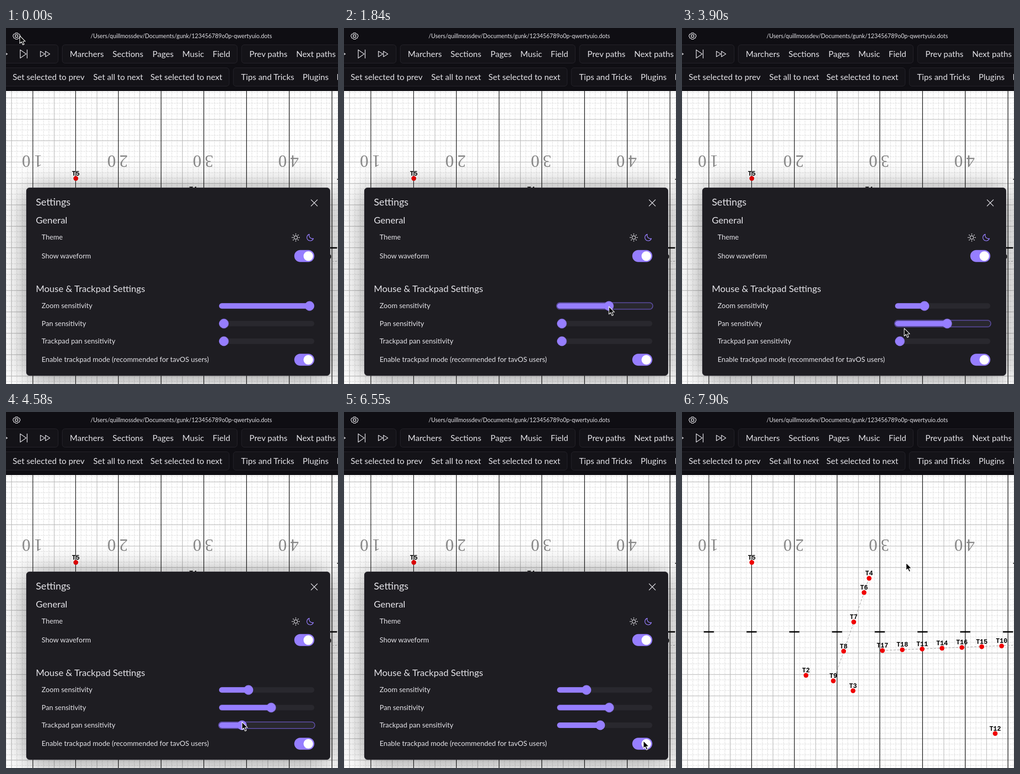
Write an HTML page that moves like this. It is 723 by 774 pixels and loops after 8000 ms.

```html
<!DOCTYPE html>
<html lang="en">
<head>
<meta charset="utf-8">
<title>Drill editor settings</title>
<style>
  html, body { margin: 0; width: 100%; height: 100%; overflow: hidden; background: #fff; }
  #stage { position: relative; width: 723px; height: 774px; overflow: hidden; }
  svg, #modal { position: absolute; left: 0; top: 0; width: 723px; height: 774px; }
  text { font-family: Lato, "Open Sans", sans-serif; fill: #e4e3e8; white-space: pre; }
  .menu { font-size: 18px; }
  .path { font-size: 12.6px; }
  .title { font-size: 21.5px; }
  .head { font-size: 20px; }
  .item { font-size: 15.3px; }
  .yard { font: 37px "Liberation Serif", "Times New Roman", serif; fill: #888; text-anchor: middle; }
  .tag { font: bold 14px "Liberation Mono", "Courier New", monospace; fill: #000; text-anchor: middle; }
  .icon { fill: none; stroke: #e4e3e8; stroke-width: 1.4; stroke-linejoin: round; stroke-linecap: round; }
  .group { fill: #141318; stroke: #27252c; }
  .panel {
    position: absolute; left: 43.5px; top: 346.5px; width: 660px; height: 407px;
    background: #1e1d22; border: 1px solid #2f2d35; border-radius: 7px;
    box-shadow: 0 4px 60px rgba(0, 0, 0, .45);
  }
  .track { fill: #29282e; }
  .accent { fill: #967eff; }
  .ring { fill: none; stroke: #5f4fa6; stroke-width: 1.8; opacity: 0; }

  /* every animation shares one 8 s clock */
  #modal, #cursor, #close, .zoom *, .pan *, .trackpad *, .flip * {
    animation: 8s linear infinite;
  }
  #modal { animation-name: dismiss; }
  #cursor { animation-name: pointer; }
  #close { animation-name: hover; }
  .zoom .fill { animation-name: zoomFill; }
  .zoom .thumb { animation-name: zoomThumb; }
  .zoom .ring { animation-name: zoomRing; }
  .pan .fill { animation-name: panFill; }
  .pan .thumb { animation-name: panThumb; }
  .pan .ring { animation-name: panRing; }
  .trackpad .fill { animation-name: trackFill; }
  .trackpad .thumb { animation-name: trackThumb; }
  .trackpad .ring { animation-name: trackRing; }
  .flip .pill { animation-name: flipPill; }
  .flip .knob { animation-name: flipKnob; }

  @keyframes zoomFill {
    0%, 18.1% { width: 197px; animation-timing-function: ease-in-out; }
    26.6%, 100% { width: 64px; }
  }
  @keyframes zoomThumb {
    0%, 18.1% { transform: translateX(197px); animation-timing-function: ease-in-out; }
    26.6%, 100% { transform: translateX(64px); }
  }
  @keyframes zoomRing { 0%, 18% { opacity: 0; } 18.01%, 36.8% { opacity: 1; } 36.81%, 100% { opacity: 0; } }
  @keyframes panFill {
    0%, 36.9% { width: 10.5px; }
    39.1% { width: 33px; animation-timing-function: ease-out; }
    42.75%, 100% { width: 113.5px; }
  }
  @keyframes panThumb {
    0%, 36.9% { transform: translateX(10.5px); }
    39.1% { transform: translateX(33px); animation-timing-function: ease-out; }
    42.75%, 100% { transform: translateX(113.5px); }
  }
  @keyframes panRing { 0%, 36.8% { opacity: 0; } 36.81%, 53.5% { opacity: 1; } 53.51%, 100% { opacity: 0; } }
  @keyframes trackFill {
    0%, 55% { width: 10.5px; }
    56% { width: 13px; animation-timing-function: ease-out; }
    60.1%, 100% { width: 94px; }
  }
  @keyframes trackThumb {
    0%, 55% { transform: translateX(10.5px); }
    56% { transform: translateX(13px); animation-timing-function: ease-out; }
    60.1%, 100% { transform: translateX(94px); }
  }
  @keyframes trackRing { 0%, 53.5% { opacity: 0; } 53.51%, 73.8% { opacity: 1; } 73.81%, 100% { opacity: 0; } }
  @keyframes flipPill { 0%, 73.8% { fill: #967eff; } 75.6%, 77.5% { fill: #35333b; } 79.3%, 100% { fill: #967eff; } }
  @keyframes flipKnob {
    0%, 73.8% { transform: none; }
    75.6%, 77.5% { transform: translateX(-17px); }
    79.3%, 100% { transform: none; }
  }
  @keyframes hover { 0%, 92.3% { stroke: #e4e3e8; } 93.5%, 100% { stroke: #dd3a47; } }
  @keyframes dismiss { 0%, 95.7% { opacity: 1; } 97.2%, 99.99% { opacity: 0; } 100% { opacity: 1; } }
  @keyframes pointer {
    0%, .375% { transform: translate(30px, 17px); animation-timing-function: ease-in; }
    4% { transform: translate(235px, 165px); }
    7% { transform: translate(540px, 385px); }
    10.2% { transform: translate(657px, 484px); animation-timing-function: ease-out; }
    13% { transform: translate(650px, 624px); }
    14.5% { transform: translate(651px, 617px); animation-timing-function: ease-in-out; }
    16.8%, 18.1% { transform: translate(661px, 605px); animation-timing-function: ease-in-out; }
    26.6%, 29.3% { transform: translate(528px, 606px); }
    31.875% { transform: translate(494px, 628px); animation-timing-function: ease-out; }
    35%, 36.9% { transform: translate(474px, 637px); }
    39.1% { transform: translate(497px, 640px); animation-timing-function: ease-out; }
    42.75%, 46.3% { transform: translate(577px, 642px); }
    48.75% { transform: translate(484px, 653px); animation-timing-function: ease-out; }
    52.5%, 55% { transform: translate(474px, 674px); }
    56% { transform: translate(477px, 674px); animation-timing-function: ease-out; }
    60.1%, 62.1% { transform: translate(558px, 674px); animation-timing-function: ease-in; }
    65% { transform: translate(630px, 540px); animation-timing-function: ease-out; }
    67.375% { transform: translate(672px, 478px); animation-timing-function: ease-in-out; }
    72.2%, 81.9% { transform: translate(652px, 715px); animation-timing-function: ease-in; }
    86% { transform: translate(645px, 520px); }
    89% { transform: translate(668px, 372px); animation-timing-function: ease-out; }
    92%, 95.3% { transform: translate(664px, 382px); animation-timing-function: ease-in-out; }
    98.6%, 100% { transform: translate(488px, 328px); }
  }
</style>
</head>
<body>
<div id="stage">
  <svg viewBox="0 0 723 774">
    <g id="field"></g>
    <rect width="723" height="137" fill="#0f0e13"/>
    <g class="group">
      <rect x="-20" y="36.5" width="133.5" height="40" rx="6"/>
      <rect x="122.5" y="36.5" width="381" height="40" rx="6"/>
      <rect x="513" y="36.5" width="240" height="40" rx="6"/>
      <rect x="-20" y="86.5" width="506" height="40" rx="6"/>
      <rect x="495" y="86.5" width="260" height="40" rx="6"/>
    </g>
    <g class="icon">
      <path d="M-8 50.5L3 56.5-8 62.5z"/>
      <path d="M31 47.5V65.5L44 56.5zM46 47.5V65.5"/>
      <path d="M75 50.5V62.5L84.5 56.5zM86 50.5V62.5L95.5 56.5z"/>
      <path stroke-width="1.3" d="M20.5 11h5l1.2 2.2 2.6.1 1.7 4.4-1.5 1.9-.3 2.2-2.6.3-1.6 2.3h-4l-1.6-2.3-2.6-.3-.3-2.2-1.5-1.9 1.7-4.4 2.6-.1z"/>
      <circle cx="23" cy="17.5" r="3"/>
    </g>
    <g id="bar"></g>
  </svg>
  <div id="modal">
    <div class="panel"></div>
    <svg viewBox="0 0 723 774">
      <g id="labels"></g>
      <path id="close" class="icon" d="M664.5 373.5l13.5 13.5M678 373.5L664.5 387"/>
      <g class="icon">
        <circle cx="631" cy="455.5" r="3.8"/>
        <path id="rays"/>
        <path style="stroke:#967eff" d="M660.5 448.5a7.2 7.2 0 1 0 8.8 9.2a7.2 7.2 0 0 1-8.8-9.2z"/>
      </g>
      <g id="controls"></g>
    </svg>
  </div>
  <svg viewBox="0 0 723 774">
    <path id="cursor" d="M0 0V16.5L3.8 13 6.6 19.6 9.5 18.4 6.7 12H12z" stroke="#fff" stroke-width="1.2" stroke-linejoin="round"/>
  </svg>
</div>
<script>
  const add = (id, html) => document.getElementById(id).insertAdjacentHTML('beforeend', html);
  const text = (id, cls, x, y, s) =>
    add(id, `<text class="${cls}" x="${x}" y="${y}">${s.replace('&', '&amp;')}</text>`);
  const line = (d, color, w = 1, dash = '') =>
    add('field', `<path d="${d}" fill="none" stroke="${color}" stroke-width="${w}" stroke-dasharray="${dash}"/>`);

  // field grid: one step is an eighth of the gap between yard lines
  const gap = 93.05, step = gap / 8;
  const grid = every => {
    let d = '';
    for (let i = 0; i < 64; i += every) d += `M${12 + i * step} 137V774`;
    for (let i = 0; i < 56; i += every) d += `M0 ${152 + i * step}H723`;
    return d;
  };
  line(grid(1) + 'M0 140.4H723M.4 137V774', '#dcdcdc', 1, '4.6 1.2');
  line(grid(4), '#b4b4b4');
  for (let i = 0; i < 8; i++) {
    const x = 58.5 + i * gap;
    line(`M${x} 137V774`, '#000', 1.2);
    line(`M${x - 11} 478h22`, '#000', 3);
    if (i % 2 == 0 && i < 8) {
      const digits = String(10 + i * 5);
      [13, -13].forEach((dx, k) =>
        add('field', `<text class="yard" transform="translate(${x + dx - 1.5} 277) rotate(180)">${digits[k]}</text>`));
    }
  }
  line('M407 361.5L330 584.5M436.5 518.5L723 507', '#999', 1, '5 3');

  const dots = {
    T5: [152, 327], T4: [407.5, 361.5], T6: [396.5, 392.5], T7: [374, 456.5], T8: [352, 520],
    T9: [329.5, 584.5], T2: [270, 572.5], T3: [372.5, 606], T12: [682, 699], T13: [733, 344.5]
  };
  [17, 18, 11, 14, 16, 15, 10].forEach((n, i) => dots['T' + n] = [436.5 + i * 43.25, 518.5 - i * 1.65]);
  for (const [name, [x, y]] of Object.entries(dots)) {
    add('field', `<circle cx="${x}" cy="${y}" r="5.2" fill="#f00000"/>`);
    text('field', 'tag', x, y - 6.5, name);
  }

  text('bar', 'path', 184, 22, '/Users/quillmossdev/Documents/gunk/123456789o0p-qwertyuio.dots');
  const menu = (y, items) => items.forEach(([x, s]) => text('bar', 'menu', x, y, s));
  menu(62.5, [[139, 'Marchers'], [232, 'Sections'], [319, 'Pages'], [384, 'Music'], [450, 'Field'],
    [530, 'Prev paths'], [632, 'Next paths']]);
  menu(112.5, [[14.5, 'Set selected to prev'], [190, 'Set all to next'], [314.5, 'Set selected to next'],
    [512, 'Tips and Tricks'], [646, 'Plugins'], [720, 'Help']]);

  text('labels', 'title', 65, 385.5, 'Settings');
  text('labels', 'head', 65, 425, 'General');
  text('labels', 'head', 65, 574, 'Mouse & Trackpad Settings');
  [[460, 'Theme'], [500.5, 'Show waveform'], [609, 'Zoom sensitivity'], [647.5, 'Pan sensitivity'],
    [686, 'Trackpad pan sensitivity'], [726, 'Enable trackpad mode (recommended for tavOS users)']]
    .forEach(([y, s]) => text('labels', 'item', 77.5, y, s));

  let rays = '';
  for (let i = 0; i < 8; i++) {
    const c = Math.cos(i * Math.PI / 4), s = Math.sin(i * Math.PI / 4);
    rays += `M${631 + 6.6 * c} ${455.5 + 6.6 * s}L${631 + 8.2 * c} ${455.5 + 8.2 * s}`;
  }
  document.getElementById('rays').setAttribute('d', rays);

  const slider = (name, y) => add('controls', `<g class="${name}" transform="translate(464 ${y})">
    <rect class="track" y="-6" width="207.5" height="12" rx="6"/>
    <rect class="fill accent" y="-6" height="12" rx="6"/>
    <rect class="ring" x="-1" y="-7.2" width="209.5" height="14.4" rx="7.2"/>
    <circle class="thumb accent" r="10.4"/></g>`);
  slider('zoom', 604.3);
  slider('pan', 642.6);
  slider('trackpad', 681);

  const toggle = (name, y) => add('controls', `<g class="${name}">
    <rect class="pill accent" x="627.8" y="${y - 13}" width="43.6" height="26" rx="13"/>
    <circle class="knob" cx="658.3" cy="${y}" r="10.4" fill="#fff"/></g>`);
  toggle('still', 495.8);
  toggle('flip', 721.3);
</script>
</body>
</html>
```
